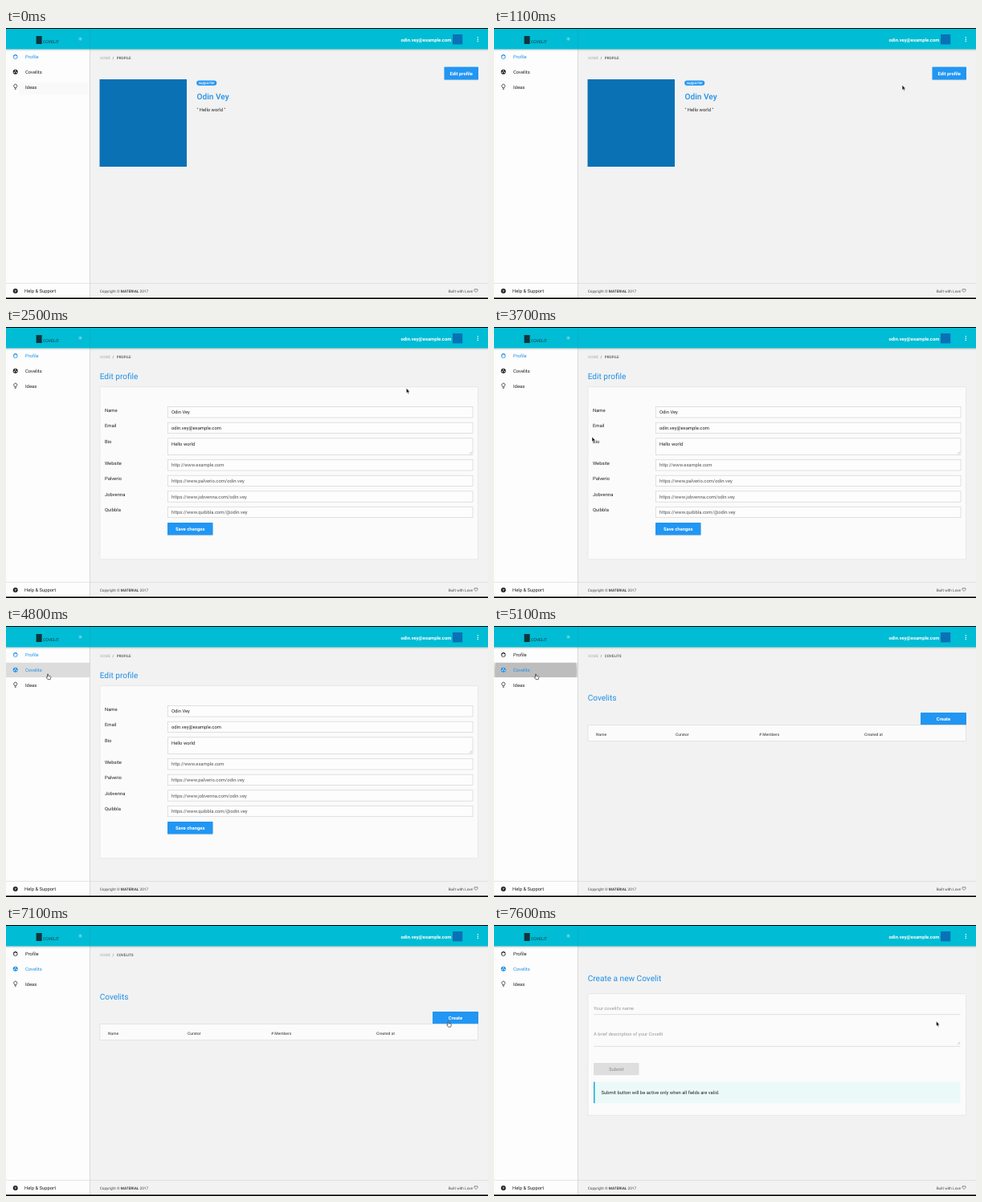
An HTML page that plays this animation: 600x338 px, repeating every 8 s.

```html
<!DOCTYPE html>
<html lang="en">
<head>
<meta charset="utf-8">
<title>Profile dashboard</title>
<style>
  html, body { margin: 0; width: 100%; height: 100%; overflow: hidden; background: #f2f2f2; }
  svg { display: block; width: 100vw; height: 100vh; }
  text { font: 5.85px Roboto, Arial, sans-serif; fill: #222; white-space: pre; text-rendering: geometricPrecision; }
  .title { font-size: 10.1px; fill: #1e8fe6; }
  .crumb { font-size: 4.6px; fill: #555; }
  .head { font-size: 4.95px; fill: #555; }
  .foot { font-size: 4.7px; fill: #444; }
  .bold { font-weight: 700; }
  .mid { font-weight: 500; }
  .pale { fill: #aaa; }
  .hint { fill: #999; }
  .url { fill: #555; }
  .white { fill: #fff; }
  .button { font-weight: 700; fill: #fff; text-anchor: middle; }
  .nav { color: #222; }
  .nav text { fill: currentColor; }
  .nav.on { color: #1e90e8; }
</style>
</head>
<body>
<svg id="stage" viewBox="0 0 600 338" preserveAspectRatio="none"></svg>
<script>
const LOOP = 8000;
const BLUE = '#2196f3';

const text = (x, y, s, cls = '', extra = '') =>
  `<text x="${x}" y="${y}" class="${cls}" ${extra}>${s}</text>`;
const rect = (x, y, w, h, fill, extra = '') =>
  `<rect x="${x}" y="${y}" width="${w}" height="${h}" fill="${fill}" ${extra}/>`;
const line = (d, stroke, width = 0.7) =>
  `<path d="${d}" fill="none" stroke="${stroke}" stroke-width="${width}"/>`;
const group = (id, body, cls = '') => `<g id="${id}" class="${cls}">${body}</g>`;

const button = (x, y, w, h, label) =>
  rect(x, y + 0.7, w, h, '#000', 'opacity=".1" rx=".8"') +
  rect(x, y, w, h, BLUE, 'rx=".6"') +
  text(x + w / 2, y + h / 2 + 2.1, label, 'button');
const card = (y, h) =>
  rect(116.9, y, 470.6, h, '#fbfbfb', 'stroke="#e2e2e2" stroke-width=".7" rx="1"');
const crumbs = name =>
  text(117, 39.4, 'HOME', 'crumb pale') + text(132.6, 39.4, '/', 'crumb') +
  text(137.7, 39.4, name, 'crumb mid');
const grip = (x, y) => line(`M${x - 3} ${y}l3-3M${x - 1.3} ${y}l1.3-1.3`, '#999', 0.5);

const icons = {
  face: `<circle cx="11.7" cy="36" r="2.5" fill="none" stroke="currentColor" stroke-width=".8"/>
    <path d="M9.2 35.6Q11 35.3 11.4 33.9Q12.5 35.2 14.2 34.9Q13.5 33 11.7 33Q9.4 33.2 9.2 35.6Z
    M10.4 36.4h.7v.7h-.7zM12.3 36.4h.7v.7h-.7z" fill="currentColor"/>`,
  group: `<circle cx="11.7" cy="54.8" r="3" fill="currentColor"/>
    <g fill="#fff"><circle cx="11.7" cy="53.4" r=".75"/><circle cx="10.4" cy="55.6" r=".75"/>
    <circle cx="13" cy="55.6" r=".75"/></g>`,
  bulb: `<path d="M10.8 75v-1a2 2 0 1 1 1.8 0v1zM10.8 76.3h1.8" fill="none"
    stroke="currentColor" stroke-width=".75"/>`
};
const navItem = (id, icon, y, label) => group(id, icons[icon] + text(24, y, label), 'nav');

const profilePage = crumbs('PROFILE') +
  rect(116.5, 64, 108.5, 109, '#0b71b5') +
  rect(237.2, 65.4, 25, 6.4, BLUE, 'rx="3.2"') +
  text(249.7, 70.1, 'supporter', 'white mid', 'text-anchor="middle" style="font-size:4.7px"') +
  text(237.6, 88.8, 'Odin Vey', 'title mid') +
  text(237.4, 104, '" Hello world "') +
  button(545.5, 48.5, 42.5, 16, 'Edit profile');

// label, value, label baseline, box top, box height, value class
const fields = [
  ['Name', 'Odin Vey', 105.6, 99.6, 13.4, ''],
  ['Email', 'odin.vey@example.com', 125.4, 119.2, 13.4, ''],
  ['Bio', 'Hello world', 144.8, 138.8, 20.6, ''],
  ['Website', 'http://www.example.com', 171.6, 165.6, 13.4, 'url'],
  ['Palverio', 'https://www.palverio.com/odin.vey', 191.2, 185.2, 13.4, 'url'],
  ['Jobvenna', 'https://www.jobvenna.com/odin.vey', 210.8, 204.8, 13.4, 'url'],
  ['Quibbla', 'https://www.quibbla.com/@odin.vey', 230.2, 224.3, 13.4, 'url']
];
const editPage = crumbs('PROFILE') + text(116.7, 65.3, 'Edit profile', 'title') +
  card(74.6, 215.2) +
  fields.map(([label, value, base, top, h, cls]) =>
    text(123, base, label) +
    rect(201.3, top, 379.7, h, '#fdfdfd', 'stroke="#d4d4d4" stroke-width=".7"') +
    text(206, top + 8.7, value, cls)).join('') +
  grip(580, 158.4) +
  group('save', button(201, 244, 56.5, 15.5, 'Save changes'));

const columns = [[127, 'Name'], [226, 'Curator'], [330, '# Members'], [461, 'Created at']];
const listPage = crumbs('COVELITS') + text(116.7, 93, 'Covelits', 'title') +
  button(531, 108, 57, 15.5, 'Create') +
  rect(116.9, 123.6, 470.6, 20, '#fbfbfb', 'stroke="#dcdcdc" stroke-width=".7"') +
  columns.map(([x, label]) => text(x, 137, label, 'head mid')).join('');

const createPage = text(116.7, 70.2, 'Create a new Covelit', 'title') + card(85.6, 151.8) +
  text(124, 106.4, "Your covelit's name", 'hint') + line('M124 111.6H580.5', '#d4d4d4') +
  text(124, 138.2, 'A brief description of your Covelit', 'hint') +
  line('M124 151.4H580.5', '#d4d4d4') + grip(580, 148.8) +
  rect(124, 172, 56.5, 15.3, '#dedede', 'rx=".8"') +
  text(152.2, 181.8, 'Submit', 'hint mid', 'text-anchor="middle"') +
  rect(124, 195.6, 456.5, 26.6, '#ebf9f8') + rect(124, 195.6, 1.5, 26.6, '#16aecb') +
  text(133.6, 211, 'Submit button will be active only when all fields are valid.');

const sidebar = rect(0, 26, 104.4, 310, '#fdfdfd') +
  rect(16, 67.5, 88.4, 15.5, '#f9f9f9', 'id="ideasHover"') +
  rect(0, 45.7, 104.4, 18.4, '#dcdcdc', 'id="hover"') +
  '<circle id="ripple" cx="52" cy="57" fill="#a9a9a9" clip-path="url(#row)"/>' +
  navItem('profile', 'face', 38.1, 'Profile') +
  navItem('list', 'group', 57, 'Covelits') +
  navItem('ideas', 'bulb', 75.7, 'Ideas') +
  line('M0 318.4H104', '#d8d8d8') + line('M104.5 26V336', '#d2d2d2', 0.8) +
  '<circle cx="11.7" cy="328" r="3" fill="#222"/>' +
  text(11.7, 329.7, '?', 'white bold', 'text-anchor="middle" style="font-size:4.6px"') +
  text(23, 330.2, 'Help &amp; Support');

const header = rect(0, 26.5, 600, 2.5, 'url(#shade)') + rect(0, 0, 600, 26.5, '#00bcd4') +
  rect(0, 0, 600, 1, '#000') +
  line('M104.5 1V26', '#05aec5', 0.7) +
  rect(37.6, 10, 7, 10, '#12343b') +
  text(46, 19.3, 'COVELIT', '', 'style="font-size:5.1px;fill:#12343b"') +
  '<circle cx="92.5" cy="13.6" r="1.6" fill="none" stroke="#a8e8f0" stroke-width=".6"/>' +
  '<circle cx="92.5" cy="13.6" r=".7" fill="#c8f2f6"/>' +
  text(554.3, 16.6, 'odin.vey@example.com', 'white bold', 'text-anchor="end"') +
  rect(556, 8, 12.2, 12.4, '#0b71b5') +
  [11.8, 14.2, 16.6].map(y => `<circle cx="587.3" cy="${y}" r=".75" fill="#fff"/>`).join('');

const footer = line('M105 318.4H600', '#d8d8d8') +
  text(116.7, 329.5, 'Copyright © <tspan class="bold">MATERIAL</tspan> 2017', 'foot') +
  text(581, 329.5, 'Built with Love', 'foot', 'text-anchor="end"') +
  line('M585 329.6L583 327.6Q582.4 325.6 584 325.5L585 326.2L586 325.5Q587.6 325.6 587 327.6Z', '#444', 0.6);

const pointers =
  group('arrow', '<path d="M0 0V6.1L1.4 4.9L2.4 7.1L3.4 6.7L2.5 4.5H4.3Z" fill="#111" stroke="#fff" stroke-width=".5"/>') +
  group('hand', `<path d="M-.5 .6Q0-.1.6.6V2.7L3.3 3.3Q4.1 3.6 3.8 4.8L3.1 7.2H.1L-1.8 4.7Q-1.7 3.7-.5 4.4Z"
    fill="#fff" stroke="#222" stroke-width=".65"/>`);

const stage = document.getElementById('stage');
stage.innerHTML = `<defs>
    <linearGradient id="shade" x2="0" y2="1"><stop stop-color="#000" stop-opacity=".18"/>
      <stop offset="1" stop-color="#000" stop-opacity="0"/></linearGradient>
    <clipPath id="row"><rect y="45.7" width="104.4" height="18.4"/></clipPath>
  </defs>` +
  rect(0, 0, 600, 338, '#f2f2f2') +
  group('page0', profilePage) + group('page1', editPage) +
  group('page2', listPage) + group('page3', createPage) +
  footer + sidebar + header + rect(0, 336.4, 600, 1.6, '#000') + group('cursor', pointers);

const el = id => document.getElementById(id);
const show = (id, on) => el(id).setAttribute('visibility', on ? 'inherit' : 'hidden');
const within = (t, from, to) => t >= from && t < to;

// Linear interpolation through rows of [time, ...values]
function track(rows, t) {
  const next = rows.findIndex(row => row[0] > t);
  if (next === 0) return rows[0].slice(1);
  if (next < 0) return rows[rows.length - 1].slice(1);
  const a = rows[next - 1], b = rows[next];
  const k = (t - a[0]) / (b[0] - a[0]);
  return a.slice(1).map((v, i) => v + (b[i + 1] - v) * k);
}

const pageStarts = [0, 1600, 5000, 7200];
const cursorPath = [
  [600, 236, 150], [1200, 562.5, 55.5], [2400, 562.5, 55.5], [2700, 370, 118],
  [3200, 370, 118], [3700, 122, 137], [3900, 122, 137], [4400, 52, 59.5],
  [5600, 52, 59.5], [5800, 140, 100], [6000, 140, 100], [6300, 509, 119.5], [6600, 550.5, 120]
];
const saveFade = [[1600, 0.6], [1900, 1]];
const rippleSteps = [[4800, 0, 0.6], [5100, 51, 0.6], [5500, 60, 0]];

function render(time) {
  const t = Math.floor(time / 100) * 100;
  const page = pageStarts.filter(start => start <= t).length - 1;
  pageStarts.forEach((_, i) => show('page' + i, i === page));

  const hovered = within(t, 4300, 5700);
  show('ideasHover', t < 600);
  show('hover', hovered);
  el('profile').classList.toggle('on', page < 2);
  el('list').classList.toggle('on', page > 1 || hovered);
  el('save').setAttribute('opacity', track(saveFade, t)[0]);

  const [radius, alpha] = track(rippleSteps, t);
  el('ripple').setAttribute('r', radius);
  el('ripple').setAttribute('opacity', alpha);

  const [x, y] = track(cursorPath, t);
  const linked = hovered || within(t, 1200, 1600) || within(t, 6500, 7200);
  show('cursor', t >= 600);
  show('arrow', t >= 600 && !linked);
  show('hand', linked);
  el('cursor').setAttribute('transform', `translate(${x} ${y})`);
}

const begin = performance.now();
function tick() {
  render((performance.now() - begin) % LOOP);
  requestAnimationFrame(tick);
}
tick();
</script>
</body>
</html>
```
